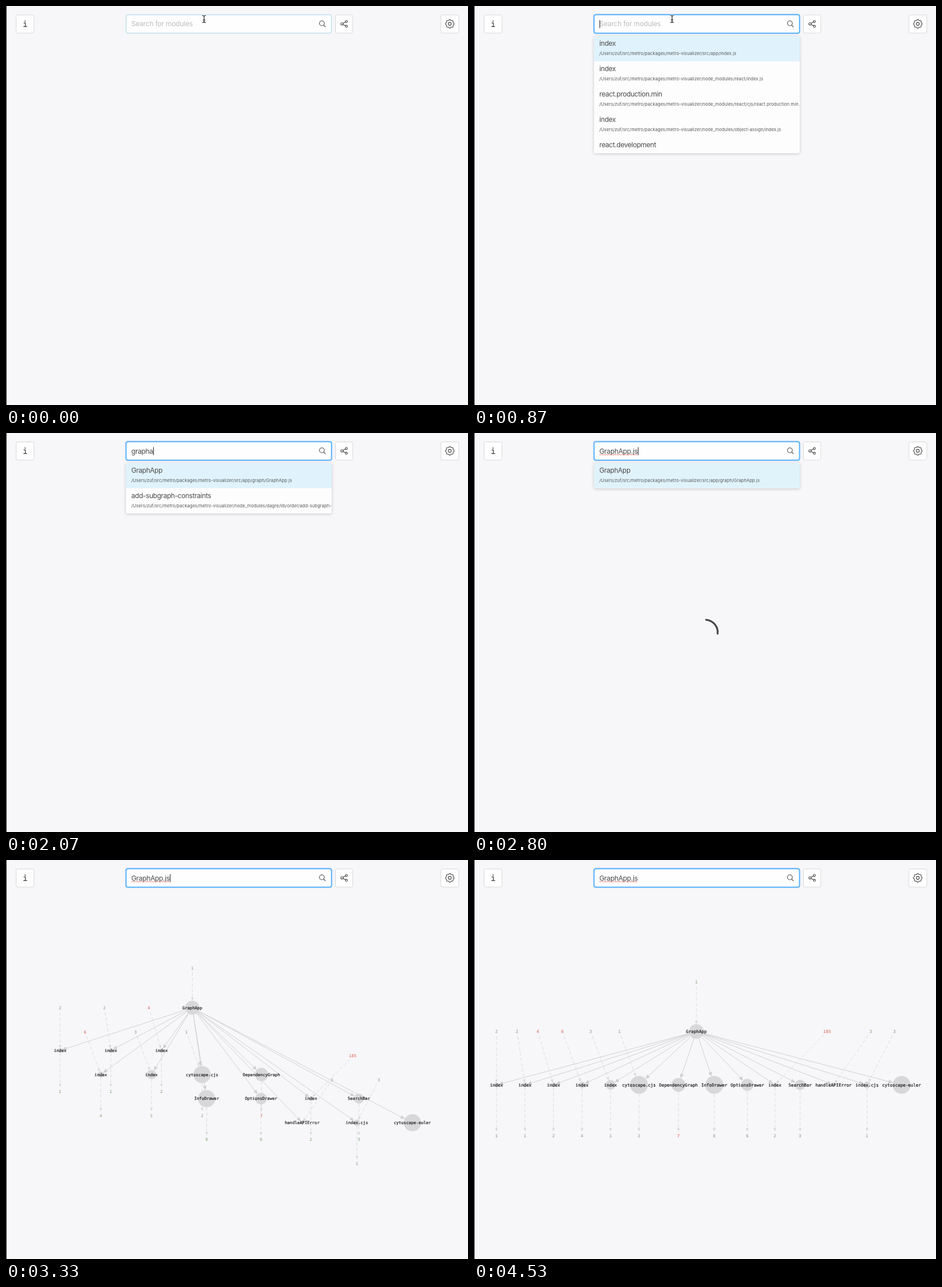
An HTML page that plays this animation: 800x692 px, repeating every 4.59 s.

```html
<!DOCTYPE html>
<html lang="en">
<head>
<meta charset="utf-8">
<title>Module graph search</title>
<style>
  html, body { margin: 0; width: 100%; height: 100%; overflow: hidden; background: #f7f6f9; }
  svg { position: fixed; left: 0; top: 0; display: block; }
  text { white-space: pre; }
  .ui { font: 12px Inter, "Open Sans", sans-serif; letter-spacing: -.35px; fill: #4a4a4a; }
  .hint { letter-spacing: -.25px; fill: #bdbdc0; }
  .name { font-size: 11.8px; }
  .path { font-size: 7.4px; letter-spacing: .155px; fill: #555; }
  .mono { font: 7.45px "DejaVu Sans Mono", "Noto Sans Mono", monospace; text-anchor: middle; }
  .label { fill: #1c1c1c; stroke: #1c1c1c; stroke-width: .2px; }
  .count { font-weight: bold; }
  .icon { fill: none; stroke: #444; stroke-width: 1.1; stroke-linecap: round; stroke-linejoin: round; }
  .button { fill: #fefefe; stroke: #d9d9db; }
  #panel { filter: drop-shadow(0 1.5px 2.5px rgba(0, 0, 0, .2)); }
</style>
</head>
<body>
<svg id="stage" width="800" height="692" viewBox="0 0 800 692">
  <defs><clipPath id="panelClip"><rect id="clipBox" x="207.5" y="52" width="356.5" rx="3"/></clipPath></defs>
  <rect width="800" height="692" fill="#f7f6f9"/>
  <rect width="1" height="692" fill="#222"/>

  <g id="graph">
    <path id="weakLines" fill="none" stroke="#dcdcde" stroke-dasharray="6 3.4"/>
    <path id="weakHeads" fill="#d9d9db"/>
    <path id="lines" fill="none" stroke="#d1d1d3"/>
    <path id="heads" fill="#cfcfd1"/>
    <g id="nodes"></g>
  </g>

  <path id="spinner" d="M401.9 324A22 22 0 0 1 421.9 348" fill="none" stroke="#444" stroke-width="3.2" stroke-linecap="round"/>

  <rect class="button" x="17.5" y="15.5" width="31" height="31.5" rx="3"/>
  <path d="M30.6 29.3H33.5V35.6M30.2 35.7H36.4" fill="none" stroke="#333" stroke-width="1.2"/>
  <circle cx="33.1" cy="26.3" r="1" fill="#333"/>

  <rect class="button" x="570.5" y="15.5" width="30" height="31.5" rx="3"/>
  <g class="icon">
    <circle cx="581.8" cy="31" r="2"/><circle cx="589.4" cy="26.8" r="1.8"/><circle cx="589.4" cy="35.2" r="1.8"/>
    <path d="M583.6 30L587.8 27.7M583.6 32L587.8 34.3"/>
  </g>

  <rect class="button" x="753" y="15.5" width="31" height="31.5" rx="3"/>
  <g class="icon"><path id="gear"/><circle cx="768.5" cy="31" r="2.6"/></g>

  <rect id="glow" x="207" y="14.2" width="357.5" height="33.8" rx="4" fill="none" stroke="#1890ff" stroke-width="1.8"/>
  <rect id="field" x="208" y="15.2" width="355.5" height="31.8" rx="3" fill="#fefefe"/>
  <text id="hint" class="ui hint" x="217" y="35.3">Search for modules</text>
  <text id="query" class="ui" x="217" y="36"></text>
  <path id="squiggle" d="M217.5 37.7H283" stroke="#e0443e" stroke-width="1.3" stroke-dasharray="1.3 1.2"/>
  <rect id="caret" y="24.5" width="1" height="14" fill="#222"/>
  <g class="icon"><circle cx="547" cy="30" r="4.2"/><path d="M550.1 33.2L553 36.2"/></g>

  <g id="panel"><g clip-path="url(#panelClip)">
    <rect id="sheet" x="207.5" y="52" width="356.5" fill="#fefdfe"/>
    <rect x="207.5" y="52" width="356.5" height="43.8" fill="#e0f3fc"/>
    <g id="items"></g>
  </g></g>

  <g id="pointer" fill="none" stroke-linecap="round">
    <path d="M340.4 16.5Q343 16.5 343 18.5V26.5Q343 28.7 340.4 28.7M345.6 16.5Q343 16.5 343 18.5M343 26.5Q343 28.7 345.6 28.7M341.3 24.2H344.7" stroke="#fff" stroke-width="2.6"/>
    <path d="M340.4 16.5Q343 16.5 343 18.5V26.5Q343 28.7 340.4 28.7M345.6 16.5Q343 16.5 343 18.5M343 26.5Q343 28.7 345.6 28.7M341.3 24.2H344.7" stroke="#111" stroke-width="1.1"/>
  </g>
</svg>

<script>
const LOOP = 4590;
const $ = id => document.getElementById(id);
const clamp = u => Math.min(1, Math.max(0, u));
const mix = (a, b, u) => a + (b - a) * u;
const show = (id, on) => { $(id).style.display = on ? '' : 'none'; };

function add(parent, tag, attrs, text) {
  const node = document.createElementNS('http://www.w3.org/2000/svg', tag);
  for (const key in attrs) node.setAttribute(key, attrs[key]);
  if (text) node.textContent = text;
  return parent.appendChild(node);
}

// Search results
const ROOT = '/Users/zuf/src/metro/packages/metro-visualizer/';
const MOD = 'node_modules/';
const group = ['Group', MOD + 'antd/lib/input/Group.js'];
const graph = ['graph', MOD + 'graphlib/lib/graph.js'];
const greedy = ['greedy-fas', MOD + 'dagre/lib/greedy-fas.js'];
const app = ['GraphApp', 'src/app/graph/GraphApp.js'];
const gradient = ['gradient-defs', ''];
const subgraph = ['add-subgraph-constraints', MOD + 'dagre/lib/order/add-subgraph-constraints.js'];
const all = [
  ['index', 'src/app/index.js'],
  ['index', MOD + 'react/index.js'],
  ['react.production.min', MOD + 'react/cjs/react.production.min.js'],
  ['index', MOD + 'object-assign/index.js'],
  ['react.development', ''],
];
const early = [group, graph, greedy, app, gradient];
const later = [graph, app, greedy, subgraph, gradient];

const steps = [
  [0, '', all],
  [1130, 'g', early],
  [1330, 'gr', early],
  [1530, 'gra', later],
  [1670, 'grap', later],
  [1870, 'graph', later],
  [2070, 'grapha', [app, subgraph]],
  [2330, 'graphap', [app]],
  [2800, 'GraphApp.js', [app]],
];

let current = null;
function setStep(step) {
  if (step === current) return;
  current = step;
  const [, word, list] = step;
  $('query').textContent = word;
  show('hint', !word);
  show('squiggle', word === 'GraphApp.js');
  $('caret').setAttribute('x', 217.3 + (word ? $('query').getComputedTextLength() : 0));
  const height = Math.min(203.6, list.length * 43.9);
  $('clipBox').setAttribute('height', height);
  $('sheet').setAttribute('height', height);
  $('items').replaceChildren();
  list.forEach(([name, path], i) => {
    const y = 52 + 44 * i;
    add($('items'), 'text', { class: 'ui name', x: 217, y: y + 17 }, name);
    if (path) add($('items'), 'text', { class: 'ui path', x: 217, y: y + 33.2 }, ROOT + path);
  });
}

// Graph: name, x, radius, [count above, its x], count below
const GREEN = '#9fb899', OLIVE = '#adb19c', RED = '#e38b82';
const spec = [
  ['GraphApp', 385, 12.8, [1, 385, GREEN]],
  ['index', 39, 4, [2, 39, OLIVE], 1],
  ['index', 88.3, 4, [2, 74.5, OLIVE], 1],
  ['index', 137.7, 4, [4, 110.5, RED], 2],
  ['index', 187, 5.5, [6, 153, RED], 4],
  ['index', 236.4, 8.5, [3, 202, OLIVE], 1],
  ['cytoscape.cjs', 285.7, 15.5, [1, 251.7, OLIVE], 2],
  ['DependencyGraph', 354, 12, null, 7],
  ['InfoDrawer', 416, 15.5, null, 8],
  ['OptionsDrawer', 473.3, 10.5, null, 6],
  ['index', 521, 4, [185, 611.5, RED], 2],
  ['SearchBar', 564.6, 9, null, 3],
  ['handleAPIError', 622.5, 3.5, [3, 687, OLIVE]],
  ['index.cjs', 680.6, 6, [3, 728, OLIVE], 1],
  ['cytoscape-euler', 740.4, 15.5],
];

const nodes = [], edges = [];
function addNode(home, x, y, r, text, fill) {
  const g = add($('nodes'), 'g');
  if (!fill) add(g, 'circle', { r, fill: '#d8d7d9' });
  add(g, 'text', { class: 'mono ' + (fill ? 'count' : 'label'), y: 2.6, ...(fill && { fill }) }, text);
  const node = { home, x, y, r, g };
  nodes.push(node);
  return node;
}
spec.forEach(([name, x, r, above, below], k) => {
  const home = { x: 72 + 242 * (k % 4), y: 90 + 210 * Math.floor(k / 4) };
  const y = k ? 390 : 297.5;
  const node = addNode(home, x, y, r, name);
  if (k) edges.push([nodes[0], node, false]);
  if (above) edges.push([addNode(home, above[1], k ? 297.7 : 211.5, 8, above[0], above[2]), node, true]);
  if (below) edges.push([node, addNode(home, x, 478.7, 8, below, below === 7 ? RED : GREEN), true]);
});

function drawGraph(p) {
  const zoom = mix(.8, 1, p);
  for (const n of nodes) {
    n.px = mix(n.home.x, n.x, p);
    n.py = mix(n.home.y, n.y, p);
    n.g.setAttribute('transform', `translate(${n.px} ${n.py}) scale(${zoom})`);
  }
  const line = ['', ''], head = ['', ''];
  for (const [a, b, weak] of edges) {
    const dx = b.px - a.px, dy = b.py - a.py, len = Math.hypot(dx, dy);
    if (len < (a.r + b.r) * zoom) continue;
    const ux = dx / len, uy = dy / len, kind = weak ? 1 : 0;
    const size = (weak ? 5.5 : 7.5) * zoom, half = size * .45;
    const tx = b.px - ux * b.r * zoom, ty = b.py - uy * b.r * zoom;
    const bx = tx - ux * size, by = ty - uy * size;
    line[kind] += `M${a.px + ux * a.r * zoom} ${a.py + uy * a.r * zoom}L${bx} ${by}`;
    head[kind] += `M${tx} ${ty}L${bx - uy * half} ${by + ux * half}L${bx + uy * half} ${by - ux * half}Z`;
  }
  $('lines').setAttribute('d', line[0]);
  $('heads').setAttribute('d', head[0]);
  $('weakLines').setAttribute('d', line[1]);
  $('weakHeads').setAttribute('d', head[1]);
}

// Eight-lobed outline
$('gear').setAttribute('d', 'M' + Array.from({ length: 64 }, (_, i) => {
  const a = i * Math.PI / 32, r = 6.9 + .6 * Math.cos(8 * a);
  return `${(768.5 + r * Math.cos(a)).toFixed(2)} ${(31 + r * Math.sin(a)).toFixed(2)}`;
}).join('L') + 'Z');

function draw(t) {
  setStep(steps.findLast(s => t >= s[0]));

  const focus = clamp((t - 40) / 230);
  $('field').setAttribute('stroke', `rgb(${mix(166, 72, focus)} ${mix(211, 170, focus)} ${mix(230, 250, focus)})`);
  $('field').setAttribute('stroke-width', mix(1, 1.5, focus));
  $('glow').setAttribute('opacity', .25 * focus);
  $('caret').setAttribute('opacity', t < 70 ? 0 : 1 - clamp((t - 4200) / 200));
  show('pointer', t < 1130);

  // The panel unfolds from its top edge, then folds back
  const open = 1 - (1 - clamp((t - 440) / 245)) ** 5;
  const shown = open * (1 - clamp((t - 2780) / 150) ** 3);
  show('panel', shown > 0);
  $('panel').setAttribute('opacity', shown);
  $('panel').setAttribute('transform', `translate(0 51.5) scale(1 ${mix(.8, 1, shown)}) translate(0 -51.5)`);

  show('spinner', t >= 2800 && t < 3130);
  show('graph', t >= 3130);
  if (t >= 3130) drawGraph(1 - (1 - clamp((t - 3032) / 540)) ** 2);
}

const start = performance.now();
function tick() {
  draw((performance.now() - start) % LOOP);
  requestAnimationFrame(tick);
}
tick();
</script>
</body>
</html>
```
